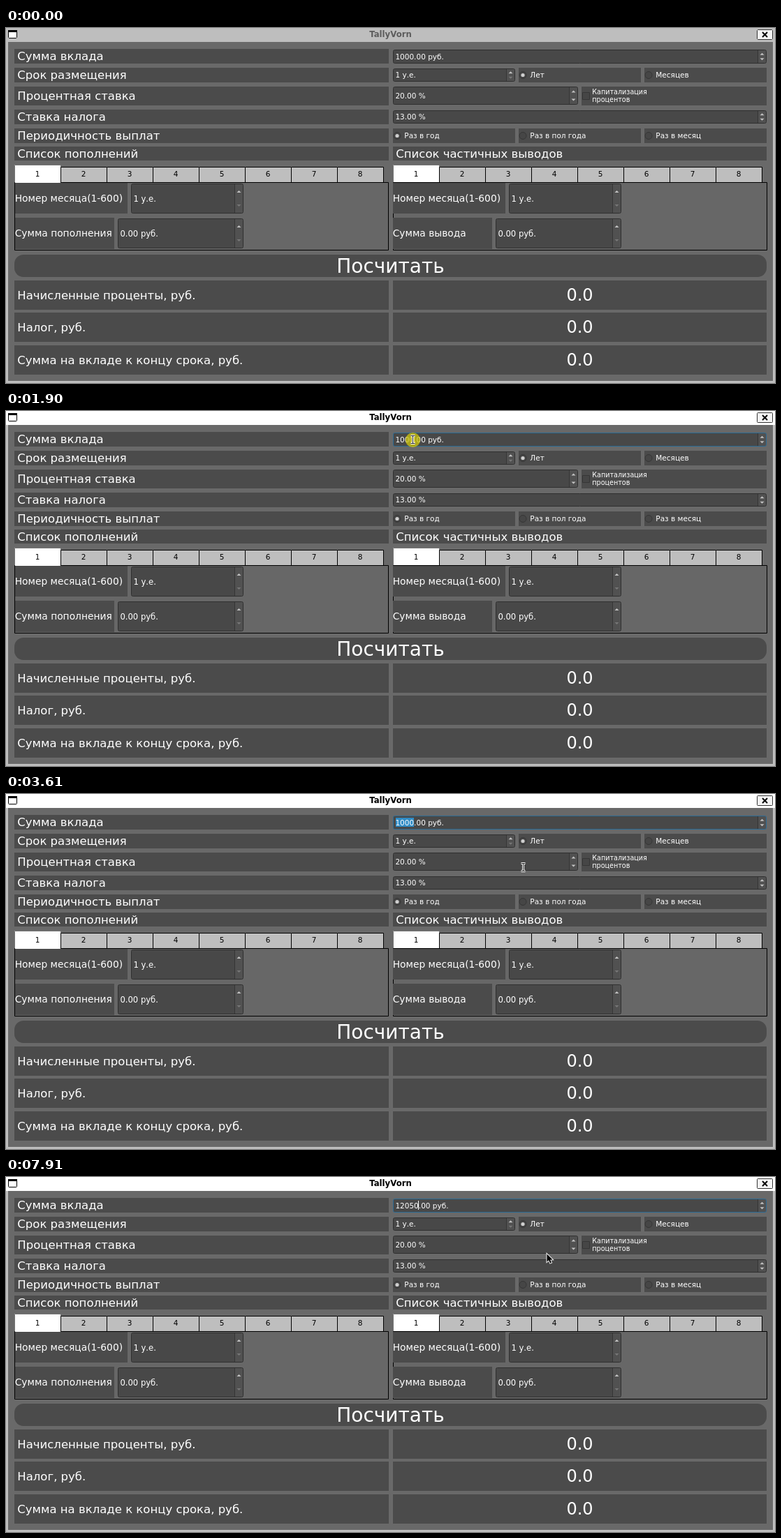
Write an HTML page with a canvas that moves like this. It is 1101 px wide and 509 px high and loops after 8000 ms.

```html
<!DOCTYPE html>
<html lang="ru">
<head>
<meta charset="utf-8">
<style>
  html, body { margin: 0; width: 100%; height: 100%; overflow: hidden; background: #696969; }
  canvas { display: block; }
</style>
</head>
<body>
<canvas id="stage" width="1101" height="509"></canvas>
<script>
const ctx = document.getElementById('stage').getContext('2d');
const LOOP = 8000, CLICK = 1800, RELEASE = 2700, FIRST_KEY = 4400;
const PANEL = '#4b4b4b', LIGHT = '#bebebe', DIM = '#777';

// [time, x, y] of the pointer hotspot
const pointerPath = [
  [20, 1041, 483], [310, 710, 95], [480, 710, 95], [1230, 616, 50], [1330, 616, 50],
  [1370, 608, 48], [1400, 608, 48], [1760, 582, 41], [2130, 582, 41], [2460, 530, 40],
  [2480, 530, 40], [2600, 525, 40], [RELEASE, 525, 40], [2870, 517, 34], [3150, 517, 34],
  [3610, 740, 105], [3710, 740, 105], [3710, 758, 108], [3750, 774, 110], [LOOP, 774, 110]
];
const typed = [[0, '1000'], [FIRST_KEY, '1'], [4870, '12'], [6170, '120'], [7350, '1205'], [7910, '12050']];
const caretShown = [[CLICK, 2130], [3990, 5450], [5920, 6770], [7290, 7890], [7910, LOOP]];
const spinFields = [[554, 31, 535, 20], [554, 58, 175, 19], [554, 84, 265, 26], [554, 118, 535, 19]];

function box(x, y, w, h, color = PANEL) {
  ctx.fillStyle = color;
  ctx.fillRect(x, y, w, h);
}

function outline(x, y, w, h, color, radius = 0) {
  ctx.strokeStyle = color;
  ctx.lineWidth = 1;
  ctx.beginPath();
  ctx.roundRect(x + .5, y + .5, w - 1, h - 1, radius);
  ctx.stroke();
}

function text(str, x, middle, size = 10.5, color = '#fff', align = 'left', weight = '') {
  ctx.font = `${weight} ${size}px "DejaVu Sans", sans-serif`;
  ctx.textAlign = align;
  ctx.fillStyle = color;
  ctx.fillText(str, x, Math.round(middle + size * .35));
}

function polygon(points, fill, stroke) {
  ctx.beginPath();
  points.forEach(([x, y]) => ctx.lineTo(x, y));
  ctx.closePath();
  if (stroke) {
    ctx.strokeStyle = stroke;
    ctx.lineWidth = 2;
    ctx.lineJoin = 'miter';
    ctx.stroke();
  }
  ctx.fillStyle = fill;
  ctx.fill();
}

function label(str, x, y, w, h, size = 16.5) {
  box(x, y, w, h);
  text(str, x + (size > 15 ? 4.3 : -.3), y + h / 2, size);
}

function spinBox([x, y, w, h], str, { size = 10.5, canGoDown = true, focus = false } = {}) {
  const right = x + w, middle = y + h / 2, gap = h > 30 ? 9.5 : h > 22 ? 5.5 : 3.3;
  box(x + 1, y + 1, w - 2, h - 2, '#484848');
  box(right - 13, y + 1, 12, h - 2, '#515151');
  box(right - 13, y + 1, 1, h - 2, '#353535');
  outline(x, y, w, h, focus ? '#2a6a94' : '#2f2f2f', 2);
  const cx = right - 6.5;
  for (const [dir, color] of [[-1, '#c4c4c4'], [1, canGoDown ? '#c4c4c4' : DIM]]) {
    const tip = middle + dir * (gap + 2), base = middle + dir * (gap - 1);
    polygon([[cx - 3, base], [cx + 3, base], [cx, tip]], color);
  }
  text(str, x + 3.4, middle, size);
}

function radio(str, x, y, w, checked) {
  box(x, y, w, 21);
  ctx.beginPath();
  ctx.arc(x + 6, y + 10.5, 5, 0, 7);
  ctx.fillStyle = '#464646';
  ctx.fill();
  ctx.strokeStyle = '#363636';
  ctx.lineWidth = 1;
  ctx.stroke();
  if (checked) {
    ctx.beginPath();
    ctx.arc(x + 6, y + 10.5, 2.6, 0, 7);
    ctx.fillStyle = '#cfcfcf';
    ctx.fill();
  }
  text(str, x + 16.3, y + 10.5);
}

function tabPane(x, amountLabel) {
  for (let i = 0; i < 8; i++) {
    const left = x + i * 66, top = i ? 199 : 196;
    box(left, top, 66, 222 - top, i ? LIGHT : '#fff');
    outline(left, top, 67, 223 - top, i ? '#000' : '#777');
    text(i + 1, left + 33, 209.5, 10.5, '#000', 'center');
  }
  box(x, 221, 536, 98, '#676767');
  outline(x, 221, 536, 98, '#000');
  if (x < 100) box(x + 1, 221, 65, 1, '#fff');
  const dx = x < 100 ? 0 : 541;
  label('Номер месяца(1-600)', dx + 13, 222, 161, 44, 13.8);
  label(amountLabel, dx + 13, 272, 142, 45, 13.8);
  const options = { size: 11.6, canGoDown: false };
  spinBox([dx + 179, 223, 161, 43], '1 у.е.', options);
  spinBox([dx + 160, 273, 180, 43], '0.00 руб.', options);
}

function windowFrame(active) {
  box(0, 0, 1101, 509, LIGHT);
  box(3, 20, 1095, 486, '#696969');
  box(0, 0, 1101, 20, active ? '#fff' : LIGHT);
  text('TallyVorn', 550.5, 8.5, 11.7, active ? '#000' : '#5c5c5c', 'center', 'bold');
  box(3, 4, 13, 11, '#fff');
  outline(3, 3, 13, 12, '#000', 1);
  box(3, 3, 13, 3, '#000');
  box(1075, 2, 23, 15, '#f4f4f4');
  outline(1075, 2, 23, 15, '#333', 1);
  ctx.strokeStyle = '#000';
  ctx.lineWidth = 2;
  ctx.beginPath();
  ctx.moveTo(1083, 6); ctx.lineTo(1090, 13);
  ctx.moveTo(1090, 6); ctx.lineTo(1083, 13);
  ctx.stroke();
}

function form(t) {
  label('Сумма вклада', 12, 30, 536, 21);
  label('Срок размещения', 12, 57, 536, 21);
  label('Процентная ставка', 12, 84, 536, 27);
  label('Ставка налога', 12, 117, 536, 21);
  label('Периодичность выплат', 12, 144, 536, 21);
  label('Список пополнений', 12, 170, 536, 20);
  label('Список частичных выводов', 554, 170, 535, 20);

  amountField(t);
  spinBox(spinFields[1], '1 у.е.', { canGoDown: false });
  radio('Лет', 734, 57, 175, true);
  radio('Месяцев', 914, 57, 175);
  spinBox(spinFields[2], '20.00 %');
  box(824, 84, 265, 27);
  box(825, 92, 11, 11, '#464646');
  outline(825, 92, 11, 11, '#363636');
  text('Капитализация', 839.3, 92, 9.6);
  text('процентов', 839.3, 103, 9.6);
  spinBox(spinFields[3], '13.00 %');
  radio('Раз в год', 554, 144, 175, true);
  radio('Раз в пол года', 734, 144, 175);
  radio('Раз в месяц', 914, 144, 175);

  tabPane(12, 'Сумма пополнения');
  tabPane(554, 'Сумма вывода');

  ctx.fillStyle = PANEL;
  ctx.beginPath();
  ctx.roundRect(12, 325, 1077, 32, 13);
  ctx.fill();
  text('Посчитать', 550.5, 341, 28, '#fff', 'center');

  ['Начисленные проценты, руб.', 'Налог, руб.', 'Сумма на вкладе к концу срока, руб.'].forEach((str, i) => {
    const y = Math.round(362 + i * 46.4);
    label(str, 12, y, 536, 42);
    box(554, y, 535, 42);
    text('0.0', 821.5, y + 21, 24, '#fff', 'center');
  });
}

const caretX = index => Math.floor(558.6 + 6.4 * index);

function amountField(t) {
  const digits = typed.findLast(([start]) => t >= start)[1];
  const str = digits + '.00 руб.';
  spinBox(spinFields[0], str, { focus: t >= CLICK, canGoDown: digits !== '1' });
  const selecting = t >= 2130 && t < FIRST_KEY;
  let index = digits.length;
  if (selecting) {
    index = Math.min(4, Math.max(0, Math.round((pointerAt(Math.min(t, RELEASE)).x - 558) / 6.4)));
    const left = caretX(index);
    ctx.save();
    ctx.beginPath();
    ctx.rect(left, 34, caretX(4) - left, 13);
    ctx.clip();
    box(left, 34, 40, 13, '#308cc6');
    text(str, 557.4, 41);
    ctx.restore();
  }
  if (caretShown.some(([on, off]) => t >= on && t < off)) box(caretX(index), 34, 1, 13, '#fff');
}

function pointerAt(t) {
  const next = pointerPath.findIndex(key => key[0] > t);
  const [t0, x0, y0] = pointerPath[next - 1], [t1, x1, y1] = pointerPath[next];
  const k = (t - t0) / (t1 - t0);
  return { x: Math.round(x0 + (x1 - x0) * k), y: Math.round(y0 + (y1 - y0) * k) };
}

function textCursor(x, y) {
  for (const [color, width] of [['#fff', 3], ['#222', 1]]) {
    ctx.strokeStyle = color;
    ctx.lineWidth = width;
    ctx.beginPath();
    for (const dir of [-1, 1]) {
      ctx.moveTo(x - 2.5, y + dir * 5.5);
      ctx.lineTo(x + 3.5, y + dir * 5.5);
    }
    ctx.moveTo(x + .5, y - 5.5);
    ctx.lineTo(x + .5, y + 5.5);
    ctx.stroke();
  }
}

function pointer(t) {
  if (t < 20) return;
  const { x, y } = pointerAt(t);
  const pressed = t >= CLICK && t < RELEASE;
  if (pressed) {
    ctx.fillStyle = 'rgba(205, 198, 12, .75)';
    ctx.beginPath();
    ctx.arc(x + .5, y + .5, 10.5, 0, 7);
    ctx.fill();
  }
  const overField = t >= CLICK && spinFields.some(([fx, fy, w, h]) =>
    x >= fx && x < fx + w - 13 && y >= fy && y < fy + h);
  if (pressed || overField) return textCursor(x, y);
  const shape = [[0, 0], [0, 11], [2.6, 8.8], [4.6, 13], [6.4, 12.2], [4.6, 8.2], [8, 8]];
  polygon(shape.map(([dx, dy]) => [x + .5 + dx, y + .5 + dy]), '#000', '#eee');
}

function draw() {
  const t = performance.now() % LOOP;
  windowFrame(t >= CLICK);
  form(t);
  pointer(t);
  requestAnimationFrame(draw);
}
draw();
</script>
</body>
</html>
```
